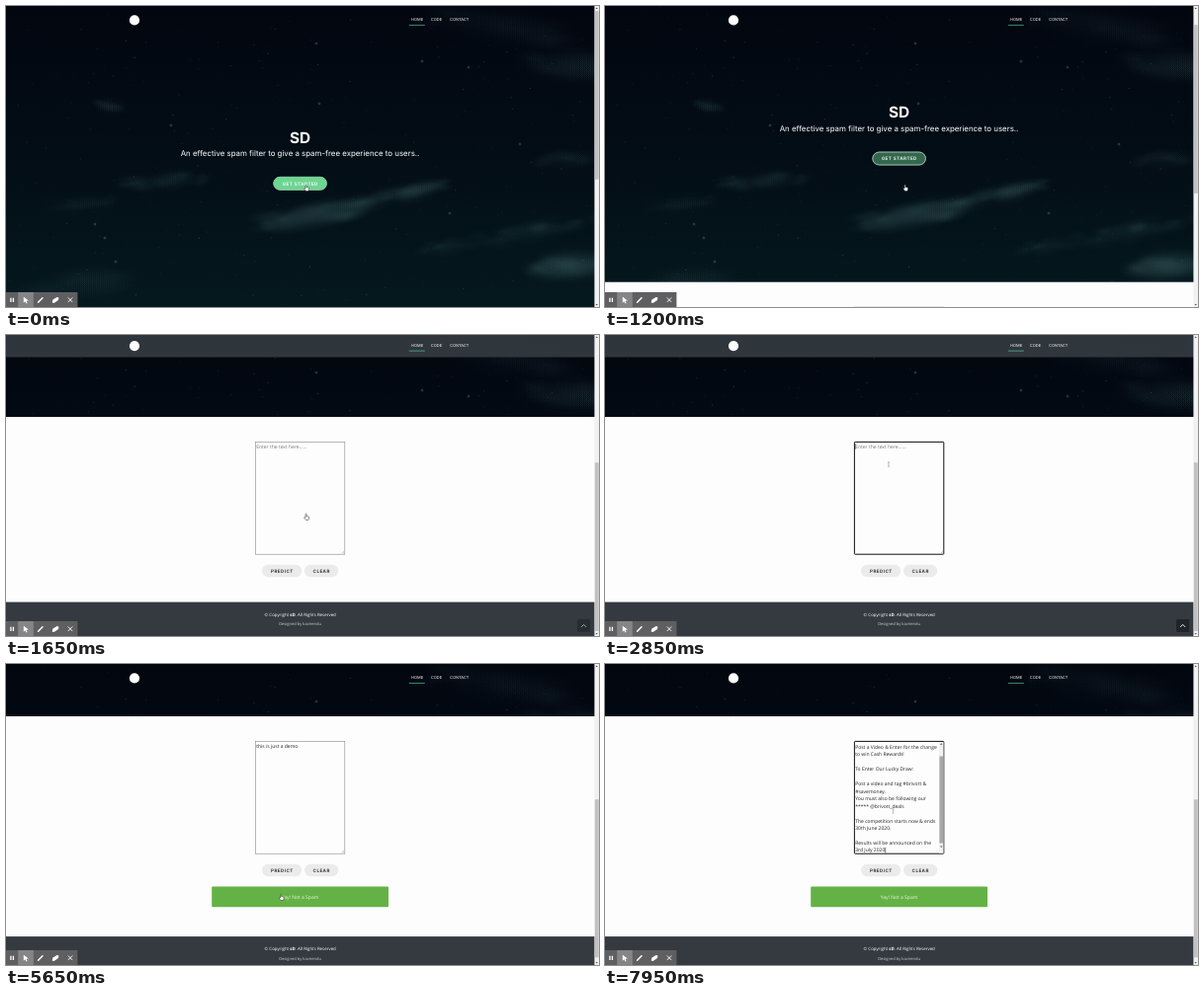
These frames come from a looping animation (600 by 305 pixels, 8 s). An HTML page with a canvas:

```html
<!DOCTYPE html>
<html lang="en">
<head>
<meta charset="utf-8">
<title>SD</title>
<style>
  html, body { margin: 0; width: 600px; height: 305px; overflow: hidden; background: #fff; }
  canvas, svg { position: absolute; left: 0; top: 0; display: block; }
  text { font-family: Inter, sans-serif; fill: #fff; text-rendering: geometricPrecision; white-space: pre; }
  .mid { text-anchor: middle; }
  .nav { font-size: 4px; }
  .btn { font-size: 4.6px; font-weight: 600; letter-spacing: .42px; }
  .body, .body text, text.body { font-family: "Open Sans", sans-serif; }
  .line { fill: none; stroke: #fff; stroke-linecap: round; stroke-linejoin: round; }
</style>
</head>
<body>
<canvas id="sky" width="600" height="305"></canvas>
<svg width="600" height="305" viewBox="0 0 600 305">
  <g id="page">
    <text class="mid" x="297.5" y="138.7" font-size="15.4" font-weight="700">SD</text>
    <text class="mid" x="297.5" y="152.3" font-size="7.88">An effective spam filter to give a spam-free experience to users..</text>
    <rect x="270.8" y="173.3" width="53.6" height="13" rx="6.5" fill="none" stroke="#fff" stroke-width=".7"/>
    <rect id="hover" x="270.5" y="173" width="54.2" height="13.6" rx="6.8" fill="#6fd492"/>
    <text class="btn mid" x="297.8" y="181.5">GET STARTED</text>

    <rect y="305" width="600" height="300" fill="#fdfdfd"/>
    <rect id="box" x="252.4" y="330.4" width="90.4" height="113.8" fill="#fdfdfd"/>
    <path d="M339.8 443.2l2-2M341.2 443.2l.7-.7" stroke="#777" stroke-width=".4"/>
    <g id="bar">
      <rect x="338" y="331" width="4.4" height="112.6" fill="#f1f1f1"/>
      <rect x="338.4" y="345.5" width="3.7" height="88" fill="#a8a8a8"/>
      <path d="M339 333.8l1.2-1.5 1.2 1.5zM339 436.5l1.2 1.5 1.2-1.5z" fill="#444"/>
    </g>
    <text id="words" class="body" font-size="5"></text>
    <path id="caret" stroke="#000" stroke-width=".5"/>
    <rect x="259" y="454.7" width="40.2" height="12.5" rx="6.2" fill="#ebebeb"/>
    <rect x="302" y="454.7" width="34.2" height="12.5" rx="6.2" fill="#ebebeb"/>
    <text class="btn mid" x="279.4" y="462.6" style="fill:#222">PREDICT</text>
    <text class="btn mid" x="319.2" y="462.6" style="fill:#222">CLEAR</text>
    <g id="result" class="body">
      <rect x="208.2" y="477.6" width="178.8" height="20.6" rx="1" fill="#64b246"/>
      <text class="mid" x="297.5" y="489.8" font-size="5" fill-opacity=".85">Yay! Not a Spam</text>
    </g>
    <g id="footer" class="body">
      <rect y="492.6" width="600" height="60" fill="#343a40"/>
      <text class="mid" x="297.7" y="506.8" font-size="4.4">© Copyright <tspan font-weight="700">sD</tspan>. All Rights Reserved</text>
      <text class="mid" x="297.6" y="516" font-size="4.06" fill-opacity=".75">Designed by kavirendu</text>
    </g>
  </g>

  <rect id="shade" width="600" fill="#343a40"/>
  <g id="header">
    <circle cx="130" cy=".4" r="5.1" fill="#fff"/>
    <text class="nav" x="410" y="1.4">HOME</text>
    <text class="nav" x="429.8" y="1.4">CODE</text>
    <text class="nav" x="449" y="1.4">CONTACT</text>
    <path d="M407.8 5.4h16" stroke="#55c3a2" stroke-width=".7"/>
  </g>

  <g id="top">
    <rect x="578" y="288" width="13.2" height="13" rx="1" fill="#1f2428"/>
    <path class="line" d="M582.4 295.6l2.2-2.2 2.2 2.2" stroke-width=".9"/>
  </g>

  <rect x="595.4" width="4.6" height="305" fill="#f1f1f1"/>
  <rect id="thumb" x="595.8" width="3.9" fill="#c1c1c1"/>
  <path d="M596.5 3l1.2-1.5 1.2 1.5zM596.5 302l1.2 1.5 1.2-1.5z" fill="#555"/>

  <rect y="290" width="72.4" height="15" fill="#5f5f62"/>
  <rect x="12.2" y="290" width="15.6" height="15" fill="#858587"/>
  <path d="M4.9 295.8v4.2M7.4 295.8v4.2" stroke="#fff" stroke-width="1.3"/>
  <path d="M17.8 294.8l5 3.6-2.3.4 1.1 2.2-1.1.5-1.1-2.3-1.6 1.5z" fill="#fff"/>
  <path class="line" d="M32.6 300.2l4.4-4.4" stroke-width="1.5"/>
  <path d="M46.8 300.8l.4-3 4.4-2.8 1.8.4-.4 2.6-4.4 3z" fill="#fff"/>
  <path class="line" d="M63 295.8l4 4M67 295.8l-4 4" stroke-width=".9"/>

  <g id="mouse">
    <path id="hand" d="M-.9-2.6q.6-.7 1 .1v2q1.600 0 2.400.8.500 2-.7 3.200h-2.200q-1-1.300-2-2.500.4-.9 1.500 0z" fill="#fff" stroke="#222" stroke-width=".5"/>
    <path id="beam" d="M-.9-2.300q.9 0 .9.500v3.600q0 .5-.9.500M.9-2.300q-.9 0-.9.500M.9 2.300q-.9 0-.9-.5" fill="none" stroke="#777" stroke-width=".5"/>
    <circle id="ring" r="10" fill="none" stroke="#cf3038" stroke-width="1.3"/>
  </g>
</svg>
<script>
const $ = id => document.getElementById(id);
const set = (id, attrs) => { for (const k in attrs) $(id).setAttribute(k, attrs[k]); };
const show = (id, on) => set(id, { visibility: on ? 'visible' : 'hidden' });
const clamp = x => Math.max(0, Math.min(1, x));
const between = (t, a, b) => t >= a && t < b;
const easeOut = (t, start, len) => 1 - (1 - clamp((t - start) / len)) ** 2;

const LOOP = 8000, RELOAD = 5350, PASTE = 7500;
const TYPED = 'this is just a demo';
const PASTED = `Post a Video & Enter for the change
to win Cash Rewards!

To Enter Our Lucky Draw:

Post a video and tag #brivott &
#savemoney.
You must also be following our
***** @brivott_deals

The competition starts now & ends
30th June 2020.

Results will be announced on the
3rd July 2020`;
const CLICKS = [[600, 850], [4650, 4950], [6350, 6650]];
const PATH = [[0, 304, 184], [1750, 304, 184], [2250, 298, 148], [2800, 298, 148], [2850, 287, 131],
  [4250, 287, 131], [4600, 278, 238], [5600, 278, 238], [6300, 308.5, 108], [7850, 308.5, 108], [7950, 291.5, 149]];

function drawSky() {
  const c = $('sky').getContext('2d');
  let seed = 7;
  const rnd = () => (seed = seed * 16807 % 2147483647) / 2147483647;
  const base = c.createLinearGradient(0, 0, 0, 305);
  base.addColorStop(0, '#02060f');
  base.addColorStop(.5, '#030d16');
  base.addColorStop(1, '#05191e');
  c.fillStyle = base;
  c.fillRect(0, 0, 600, 305);

  // x, y, length, thickness, slope, strength
  const clouds = [[105, 101, 24, 10, .1, .08], [160, 177, 90, 12, -.06, .15], [75, 200, 70, 12, -.1, .07],
    [312, 211, 105, 20, -.14, .3], [395, 192, 105, 14, -.2, .24], [510, 232, 180, 14, -.17, .22],
    [570, 263, 70, 20, 0, .26], [500, 22, 140, 26, .12, .06], [570, 60, 80, 24, .15, .08],
    [565, 155, 60, 14, -.1, .07], [60, 285, 130, 22, -.1, .07]];
  for (const [x, y, len, thick, slope, strength] of clouds) {
    for (let i = 0; i < 40; i++) {
      const u = rnd() * 2 - 1, r = thick * (.4 + .6 * rnd()) * (1 - .5 * u * u);
      c.save();
      c.translate(x + u * len / 2, y + u * len / 2 * slope + (rnd() - .5) * thick * .8);
      c.rotate(slope);
      c.scale(1.8, .75);
      const g = c.createRadialGradient(0, 0, 0, 0, 0, r);
      g.addColorStop(0, `rgba(54,88,92,${strength * .36})`);
      g.addColorStop(1, 'rgba(54,88,92,0)');
      c.fillStyle = g;
      c.fillRect(-r, -r, 2 * r, 2 * r);
      c.restore();
    }
  }
  const star = (x, y, r, a) => {
    c.fillStyle = `rgba(150,175,185,${a})`;
    c.beginPath();
    c.arc(x, y, r, 0, 7);
    c.fill();
  };
  for (let i = 0; i < 300; i++) star(rnd() * 596, rnd() * 305, .3 + .25 * rnd(), .12 + .22 * rnd());
  for (const [x, y] of [[314, 38], [167, 121], [111, 259], [317, 99], [100, 235], [520, 140],
    [449, 210], [421, 56], [90, 221], [468, 62]]) {
    star(x, y, 1.7, .12);
    star(x, y, .7, .4);
  }
}

function scrollAt(t) {
  if (t >= RELOAD) return 252;
  const x = (t - 657) / 1445;
  if (x <= 0) return 0;
  const y = x < .5 ? 2 ** (20 * x - 10) / 2 : 1 - 2 ** (10 - 20 * x) / 2;
  return Math.min(222, 280 * y);
}

function mouseAt(t) {
  const i = PATH.findIndex(p => p[0] > t);
  if (i < 0) return PATH[PATH.length - 1].slice(1);
  const [t0, x0, y0] = PATH[i - 1], [t1, x1, y1] = PATH[i];
  let u = (t - t0) / (t1 - t0);
  u = u * u * (3 - 2 * u);
  return [x0 + (x1 - x0) * u, y0 + (y1 - y0) * u];
}

let shown;
function setWords(text, hint, y) {
  if (shown === text) return;
  shown = text;
  const lines = (text || hint).split('\n');
  $('words').style.fill = text ? '#222' : '#757575';
  $('words').replaceChildren(...lines.map((line, i) => {
    const span = document.createElementNS('http://www.w3.org/2000/svg', 'tspan');
    span.setAttribute('x', 253.2);
    span.setAttribute('y', y + i * 7.48);
    span.textContent = line;
    return span;
  }));
  const last = $('words').lastChild;
  const x = 253.2 + (text ? last.getComputedTextLength() + .3 : 0);
  set('caret', { d: `M${x} ${y + (lines.length - 1) * 7.48 - 4.6}v5.8` });
}

function draw(t) {
  const scroll = scrollAt(t), loaded = t >= RELOAD, pasted = t >= PASTE;
  const height = loaded ? 562 : 527;
  set('page', { transform: `translate(0 ${-scroll})` });
  set('hover', { opacity: 1 - easeOut(t, 1037, 500) });
  set('thumb', { y: 5 + scroll * 295 / height, height: 295 * 305 / height });

  const p = loaded ? 0 : easeOut(t, 1290, 350);
  set('shade', { height: 28 - 5.5 * p, opacity: .92 * p });
  set('header', { transform: `translate(0 ${14 - 3.3 * p})` });
  set('top', { opacity: loaded ? 0 : clamp((t - 1290) / 600) });

  const focus = between(t, 2850, 4700) || t >= 6400;
  set('box', { stroke: focus ? '#111' : '#888', 'stroke-width': focus ? 1 : .6, rx: focus ? .7 : 0 });
  const typed = TYPED.slice(0, Math.ceil(clamp((t - 3200) / 1050) * TYPED.length));
  setWords(pasted ? PASTED : typed, 'Enter the text here......', pasted ? 337.7 : 336.7);
  show('caret', focus);
  show('bar', pasted);
  show('result', loaded);
  set('footer', { transform: `translate(0 ${loaded ? 35.5 : 0})` });

  const [x, y] = mouseAt(t);
  const beam = between(t, 1750, 4500) || t >= 6000;
  set('mouse', { transform: `translate(${x} ${y})` });
  show('hand', !beam);
  show('beam', beam);
  show('ring', CLICKS.some(([a, b]) => between(t, a, b)));
}

drawSky();
const start = performance.now();
(function tick() {
  draw((performance.now() - start) % LOOP);
  requestAnimationFrame(tick);
})();
</script>
</body>
</html>
```
